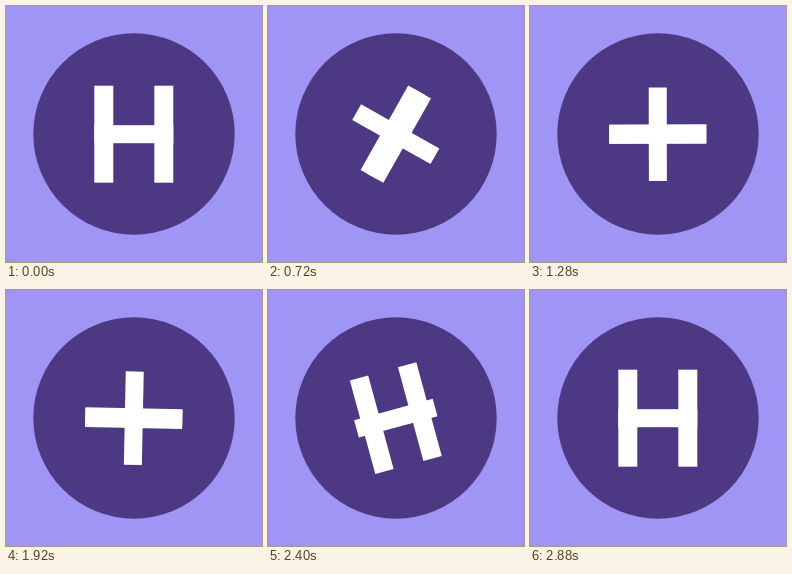
These frames come from a looping animation (256 by 256 pixels, 3.04 s). An HTML page:

```html
<!DOCTYPE html>
<html lang="en">
<head>
<meta charset="utf-8">
<style>
  html, body { margin: 0; width: 100%; height: 100%; overflow: hidden; background: #9f95f5; }
  svg { display: block; width: 100vw; height: 100vh; }
</style>
</head>
<body>
<svg viewBox="0 0 256 256">
  <circle cx="128" cy="128" r="100.7" fill="#4c3883"/>
  <g id="glyph" fill="#fff">
    <rect id="left" y="-48.5" width="19" height="97"/>
    <rect id="right" y="-48.5" width="19" height="97"/>
    <rect id="cross" y="-9" height="18"/>
  </g>
</svg>
<script>
const LOOP = 3040, STEP = 40;
const GAP = 30, SHORT = 79, LONG = 93.5;
const [glyph, left, right, cross] =
  ['glyph', 'left', 'right', 'cross'].map(id => document.getElementById(id));

// Cubic Bezier easing (x1, 0, x2, 1), solved by bisection
function ease(x, x1, x2) {
  if (x <= 0) return 0;
  if (x >= 1) return 1;
  let lo = 0, hi = 1, s;
  for (let i = 0; i < 30; i++) {
    s = (lo + hi) / 2;
    const r = 1 - s;
    if (3 * r * r * s * x1 + 3 * r * s * s * x2 + s ** 3 < x) lo = s;
    else hi = s;
  }
  return s * s * (3 - 2 * s);
}

function draw(time) {
  const t = Math.floor(time % LOOP / STEP) * STEP;
  const merge = duration => ease((t - 200) / duration, 0.8, 0.2);
  const open = ease((t - 1760) / 1120, 0.8, 0.11);

  const angle = 90 * (merge(1130) + open);
  const gap = GAP * (1 - merge(800) + open);
  const length = SHORT + (LONG - SHORT) * (merge(920) - open);

  glyph.setAttribute('transform', `translate(127.8 128.2) rotate(${angle})`);
  left.setAttribute('x', -gap - 9.5);
  right.setAttribute('x', gap - 9.5);
  cross.setAttribute('x', -length / 2);
  cross.setAttribute('width', length);
}

const start = performance.now();
function tick() {
  draw(performance.now() - start);
  requestAnimationFrame(tick);
}
tick();
</script>
</body>
</html>
```
